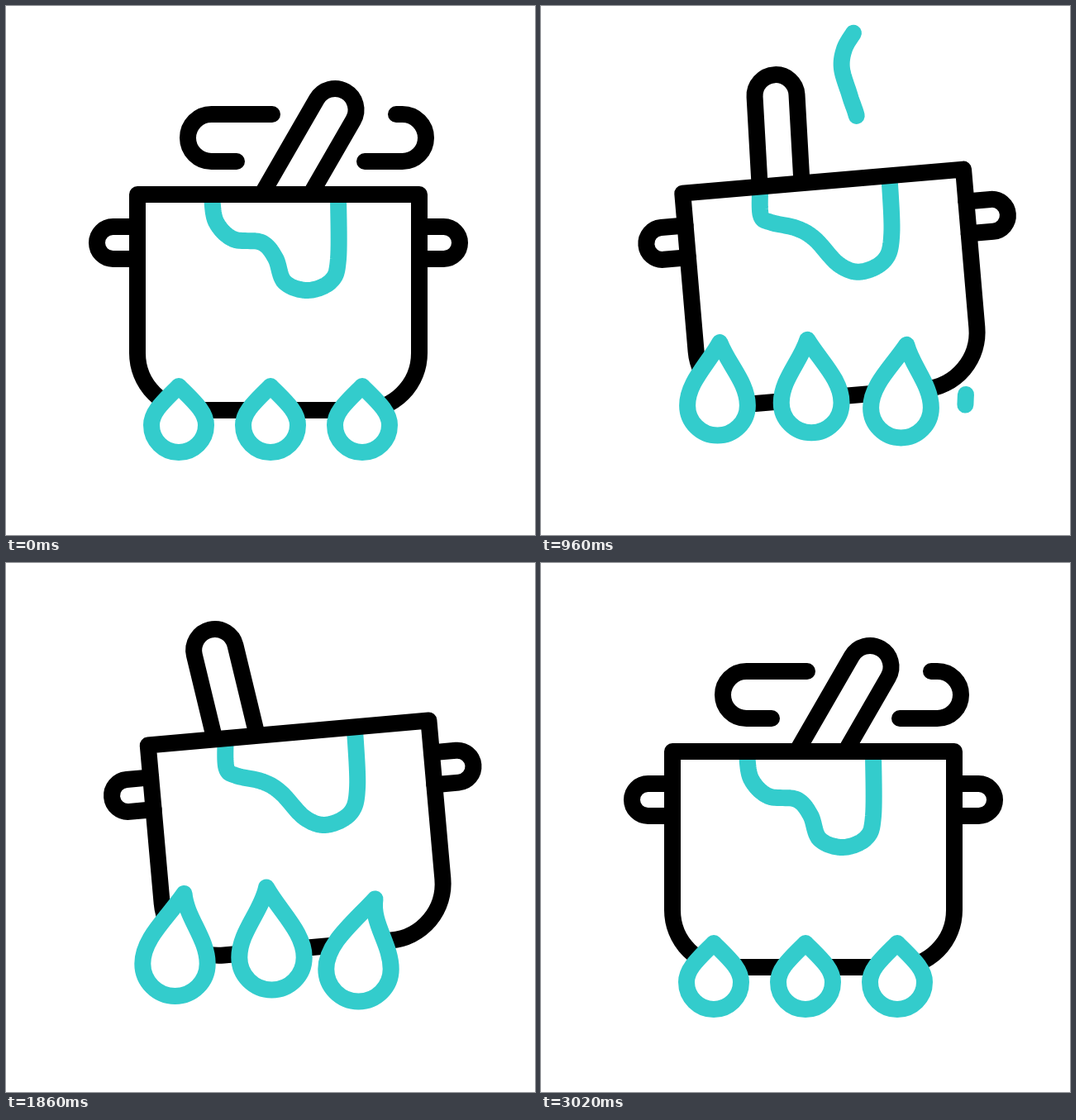
These frames come from a looping animation (640 px wide and 640 px high, 3.12 s). An HTML page with a canvas:

```html
<!DOCTYPE html>
<html lang="en">
<head>
<meta charset="utf-8">
<title>Cooking pot</title>
<style>
html, body { margin: 0; width: 100%; height: 100%; overflow: hidden; background: #fff; }
canvas { display: block; width: 100vmin; height: 100vmin; }
</style>
</head>
<body>
<canvas id="stage" width="640" height="640"></canvas>
<script>
const ctx = document.getElementById('stage').getContext('2d');
const LOOP = 3120, BLACK = '#000', TEAL = '#33cccc', WHITE = '#fff';
const PIVOT = [329.5, 91];
const radians = degrees => degrees * Math.PI / 180;
const progress = (from, to, t) => Math.min(1, Math.max(0, (t - from) / (to - from)));

// Monotone cubic interpolation: smooth, flat at extremes.
function track(times, values, t) {
  const n = times.length - 1;
  if (t <= times[0]) return values[0];
  if (t >= times[n]) return values[n];
  let i = 0;
  while (t > times[i + 1]) i++;
  const slope = k => (values[k + 1] - values[k]) / (times[k + 1] - times[k]);
  const tangent = k => {
    if (k === 0 || k === n) return 0;
    const a = slope(k - 1), b = slope(k);
    return a * b <= 0 ? 0 : 2 * a * b / (a + b);
  };
  const h = times[i + 1] - times[i], u = (t - times[i]) / h, v = 1 - u;
  return values[i] * v * v * (1 + 2 * u) + values[i + 1] * u * u * (3 - 2 * u)
    + h * (tangent(i) * u * v * v - tangent(i + 1) * u * u * v);
}

// Smooth curve through points, with its length.
function spline(points) {
  const path = new Path2D();
  let length = 0, last = points[0];
  path.moveTo(...last);
  for (let i = 0; i < points.length - 1; i++) {
    const [a, b, c, d] = [-1, 0, 1, 2].map(k => points[Math.min(points.length - 1, Math.max(0, i + k))]);
    for (let s = 1; s <= 12; s++) {
      const u = s / 12;
      const p = [0, 1].map(k => b[k] + u / 2 * (c[k] - a[k]
        + u * (2 * a[k] - 5 * b[k] + 4 * c[k] - d[k] + u * (3 * (b[k] - c[k]) + d[k] - a[k]))));
      path.lineTo(...p);
      length += Math.hypot(p[0] - last[0], p[1] - last[1]);
      last = p;
    }
  }
  return { path, length };
}

function stroke(path, color, fill) {
  if (fill) { ctx.fillStyle = fill; ctx.fill(path); }
  ctx.strokeStyle = color;
  ctx.stroke(path);
}

function strokePart({ path, length }, color, from, to) {
  if (to - from < 0.005) return;
  if (from > 0 || to < 1) {
    ctx.setLineDash([(to - from) * length, length * 3]);
    ctx.lineDashOffset = -from * length;
  }
  stroke(path, color);
  ctx.setLineDash([]);
}

const potBody = new Path2D('M159 228H500V420A69 69 0 0 1 431 489H228A69 69 0 0 1 159 420Z');
const handles = new Path2D('M159 267H129.5A19.5 19.5 0 0 0 129.5 306H159M500 267H529.5A19.5 19.5 0 0 1 529.5 306H500');
const spoon = new Path2D('M-25.5 150V0A25.5 25.5 0 0 1 25.5 0V150');
const whirls = [
  { path: new Path2D('M322 131H248.5A28.5 28.5 0 0 0 248.5 188H279'), length: 193.5 },
  { path: new Path2D('M472 131H479.5A28.5 28.5 0 0 1 479.5 188H434'), length: 142 }
];

const steamShape = [[228, 212], [250, 186], [259, 160], [250, 133], [240, 105], [243, 85], [254, 69]];
const steam = (dx, dy, scale) => spline(steamShape.map(([x, y]) => [x + dx, 160 + dy + (y - 160) * scale]));
const swish = dy => spline([[348, 583 + dy], [400, 593 + dy], [455, 587 + dy], [500, 566 + dy], [530, 539 + dy], [550, 500 + dy]]);
const backSwish = spline([[514, 470], [510, 505], [490, 548], [453, 581], [405, 600], [355, 606], [307, 602], [235, 580]]);

// Each trail: the head runs along the curve, then the tail follows.
const trails = [
  { curve: steam(124, -18, 1.2), head: [540, 908], tail: [720, 1280] },
  { curve: steam(0, 0, 1), head: [1040, 1268], tail: [1156, 1648] },
  { curve: steam(226, -17, 1), head: [2060, 2382], tail: [2285, 2680] },
  { curve: swish(0), head: [500, 720], tail: [680, 900] },
  { curve: backSwish, head: [936, 1650], tail: [1178, 1796] },
  { curve: swish(10), head: [1920, 2140], tail: [2100, 2320] }
];

const SWING = [200, 700, 1200, 1450, 1860, 2260, 2960];

// Surface at rest: x, y, share of the level change, and x, y shift when soft.
const surface = [
  [249, 230, 0, 4, 0], [254, 261, 0.5, -3, 3], [275, 282, 1, -13, -7], [309, 286, 1, -16, -1],
  [326, 305, 1, -12, -5], [337, 334, 1, 3, -1], [365, 344, 1, 1, 0], [393, 333, 1, 3, -1],
  [402, 306, 1, 5, -5], [402, 230, 0, 8, 0]
];

function drawLiquid(t) {
  const level = track(SWING, [0, -24, 24, 38, -1, -23, 0], t);
  const soft = track([200, 680, 1860, 2400], [0, 1, 1, 0], t);
  stroke(spline(surface.map(([x, y, share, dx, dy]) =>
    [x + soft * dx, y + share * level + soft * dy])).path, TEAL);
}

function drawSpoon(t) {
  ctx.save();
  ctx.translate(track(SWING, [398, 175, 403, 442, 250, 181, 398], t),
    track([200, 700, 2360, 2960], [125.5, 120, 121, 125.5], t));
  ctx.rotate(radians(track(SWING, [30, -12, 16.8, 21, -8.5, -17, 30], t)));
  stroke(spoon, BLACK, WHITE);
  ctx.restore();
}

function drawPot(t) {
  const angle = track([240, 680, 920, 1200, 1360, 1500, 1880, 2360, 2980],
    [0, -3.4, -5.2, 1.84, 3.9, 2.35, -5.1, 3.9, 0], t);
  const lift = track([200, 700, 1200, 1500, 1670, 1860, 2220], [0, -33, 0, -25, -33, -22, 0], t);
  ctx.save();
  ctx.translate(PIVOT[0], PIVOT[1] + lift);
  ctx.rotate(radians(angle));
  ctx.translate(-PIVOT[0], -PIVOT[1]);
  drawSpoon(t);
  ctx.fillStyle = WHITE;
  ctx.fill(potBody);
  drawLiquid(t);
  stroke(handles, BLACK);
  stroke(potBody, BLACK);
  ctx.restore();
}

// How far each flame leans, rises and shifts when blown.
const flames = [
  { x: 209, lean: 11, rise: 0, shift: 0 },
  { x: 320, lean: -6.5, rise: -7.5, shift: 6 },
  { x: 431, lean: 20, rise: 6.5, shift: 0 }
];

function drawFlame(tipX, tipY, x, bottom, w) {
  const y = bottom - w, h = y - tipY, k = w * 0.5523;
  const spread = 16 - (h - 47) * 0.12, lean = (x - tipX) * 0.8;
  const neck = side => [tipX + lean + side * spread, tipY + h * 0.35];
  const path = new Path2D();
  path.moveTo(tipX, tipY);
  path.bezierCurveTo(...neck(-1), x - w, y - h * 0.36, x - w, y);
  path.bezierCurveTo(x - w, y + k, x - k, bottom, x, bottom);
  path.bezierCurveTo(x + k, bottom, x + w, y + k, x + w, y);
  path.bezierCurveTo(x + w, y - h * 0.36, ...neck(1), tipX, tipY);
  path.closePath();
  stroke(path, TEAL, WHITE);
}

function drawFlames(t) {
  const pose = values => track([200, 680, 1200, 1500, 1860, 2360, 2980], values, t);
  const stretch = pose([0, 40, 26, 25, 44, 13, 0]);
  const lift = pose([0, -26, -13, -6, -16, -5, 0]);
  const blow = pose([0, 1, 0, 0, 1, 0.4, 0]);
  const drift = pose([0, 4.5, 4.5, 0, -4.5, -1, 0]);
  for (const f of flames) {
    const x = f.x + drift + f.shift * blow;
    const bottom = 540 + lift + f.rise * blow;
    const tipX = x + f.lean * blow - 0.11 * stretch * (1 - blow);
    drawFlame(tipX, bottom - 80 - stretch, x, bottom, 33 + stretch * 0.05 + blow * 4);
  }
}

function draw(t) {
  ctx.fillStyle = WHITE;
  ctx.fillRect(0, 0, 640, 640);
  ctx.lineWidth = 20;
  ctx.lineCap = ctx.lineJoin = 'round';

  const leaving = t < LOOP / 2;
  const from = leaving ? track([190, 420], [0, 1], t) : 0;
  const to = leaving ? 1 : track([2720, 3020], [0, 1], t);
  whirls.forEach(w => strokePart(w, BLACK, from, to));
  trails.forEach(({ curve, head, tail }) =>
    strokePart(curve, TEAL, progress(...tail, t), progress(...head, t)));
  drawPot(t);
  drawFlames(t);
}

const start = performance.now();
function frame() {
  draw((performance.now() - start) % LOOP);
  requestAnimationFrame(frame);
}
frame();
</script>
</body>
</html>
```
